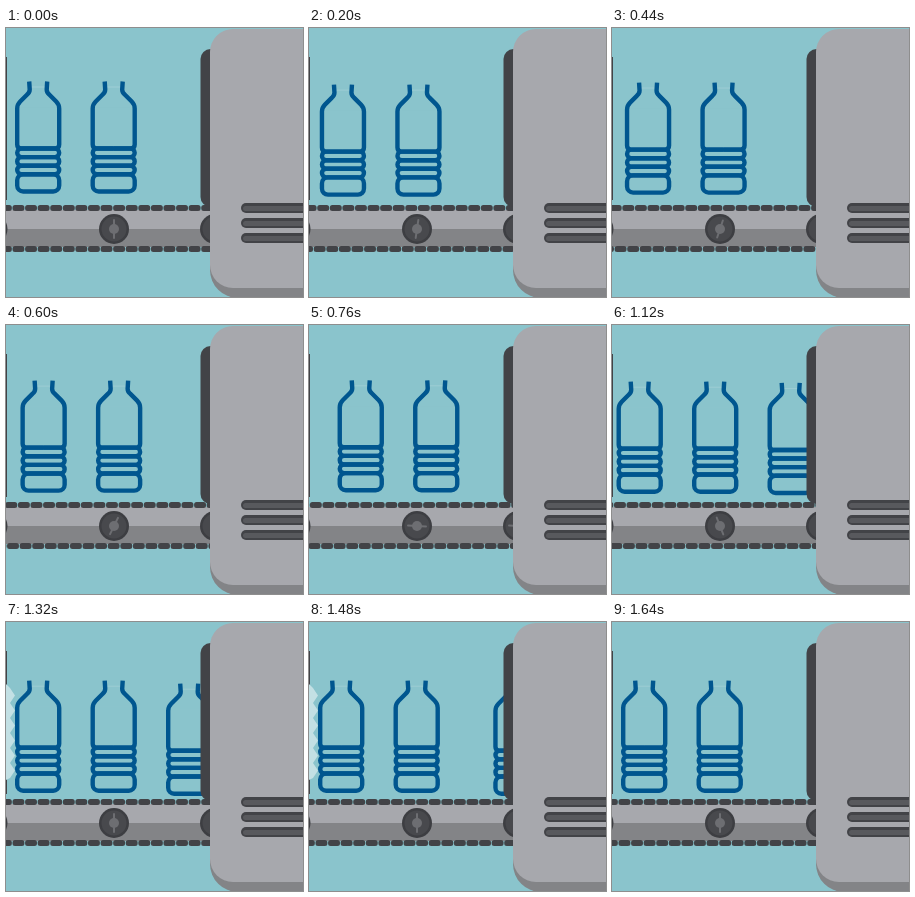
An HTML page with a canvas that plays this animation: 297 by 269 pixels, repeating every 1680 ms.

```html
<!DOCTYPE html>
<html lang="en">
<head>
<meta charset="utf-8">
<title>Bottle conveyor</title>
<style>
html, body { margin: 0; width: 100%; height: 100%; overflow: hidden; background: #8ac4cc; }
canvas { display: block; }
</style>
</head>
<body>
<canvas id="stage" width="297" height="269"></canvas>
<script>
const ctx = document.getElementById('stage').getContext('2d');
const LOOP = 1680, STEP = 40, PITCH = 75.5;
const SKY = '#8ac4cc', DARK = '#424347', LIGHT = '#a7a8ad', SHADE = '#838487', BLUE = '#00568f';

const clamp = v => Math.min(1, Math.max(0, v));

function ease(t, start, duration) {
  const u = clamp((t - start) / duration);
  return u * u * (3 - 2 * u);
}

// A slow creep, then one quick eased push to the next place
const travel = t => 5 * clamp(t / 570) + (PITCH - 5) * ease(t, 570, 650);

// A small bob that settles, then a slight sink
const baseline = t =>
  167.3 - 1.8 * Math.cos(t / 420 * Math.PI * 2) * clamp(1 - t / 760) + 3.4 * ease(t, 960, 360);

function box(x, y, w, h, r, color) {
  ctx.beginPath();
  ctx.roundRect(x, y, w, h, r);
  ctx.fillStyle = color;
  ctx.fill();
}

function disc(x, y, r, color) {
  ctx.beginPath();
  ctx.arc(x, y, r, 0, Math.PI * 2);
  ctx.fillStyle = color;
  ctx.fill();
}

// Half of the upper outline; side is -1 or 1
function shoulder(side) {
  ctx.beginPath();
  ctx.moveTo(9 * side, -112);
  ctx.lineTo(8.5 * side, -104);
  ctx.quadraticCurveTo(8.5 * side, -101, 11 * side, -99);
  ctx.lineTo(18 * side, -92);
  ctx.quadraticCurveTo(21 * side, -89, 21 * side, -85);
  ctx.lineTo(21 * side, -49);
  ctx.quadraticCurveTo(21 * side, -45, 17 * side, -45);
  ctx.lineTo(0, -45);
  ctx.stroke();
}

function bottle(x, bottom) {
  ctx.save();
  ctx.translate(x, bottom);
  box(-8, -107, 16, 1, 0, '#9ccdd4');
  box(-21, -86, 42, 84, 4, SKY);
  ctx.strokeStyle = BLUE;
  ctx.lineWidth = 4.4;
  ctx.lineJoin = 'round';
  shoulder(-1);
  shoulder(1);
  const rib = 8.6;
  for (let i = 0; i < 4; i++) {
    const last = i === 3;
    ctx.beginPath();
    ctx.roundRect(-21, -45 + i * rib, 42, last ? 17.2 : rib, last ? 6 : rib / 2);
    ctx.stroke();
  }
  ctx.restore();
}

function treads(y, shift) {
  const pitch = PITCH / 6;
  const start = (6.5 + shift + PITCH) % pitch - pitch;
  for (let x = start; x < 206; x += pitch) box(x, y, pitch - .7, 6, 2.5, DARK);
}

function pulley(x, angle) {
  disc(x, 201, 15, '#3d3e42');
  disc(x, 201, 12.5, '#48494d');
  ctx.save();
  ctx.translate(x, 201);
  ctx.rotate(angle);
  box(-1, -10, 2, 20, 1, '#6d6e72');
  ctx.restore();
  disc(x, 201, 5, '#6d6e72');
}

function belt(shift) {
  box(0, 182, 206, 19, 0, LIGHT);
  box(0, 201, 206, 18, 0, SHADE);
  treads(177, shift);
  treads(218, -shift);
  const angle = shift / PITCH * Math.PI * 2;
  [-13.5, 108, 209].forEach(x => pulley(x, angle));
}

function machine() {
  box(194.5, 21, 30, 158, 10, DARK);
  box(204, 20, 130, 250, 28, SHADE);
  box(204, 1, 130, 259, 23, LIGHT);
  for (let y = 175; y <= 205; y += 15) {
    box(235, y, 80, 10, 5, DARK);
    box(237, y + 3, 80, 5, 2.5, '#58595d');
  }
}

function burst() {
  ctx.fillStyle = '#c3e0e4';
  ctx.beginPath();
  ctx.moveTo(0, 62);
  for (let i = 0; i <= 12; i++) ctx.lineTo(i % 2 ? 9 : 4, 66 + i * 7.5);
  ctx.lineTo(0, 158);
  ctx.fill();
}

function draw(t) {
  const shift = travel(t), bottom = baseline(t);
  box(0, 0, 297, 269, 0, SKY);
  box(0, 29, 1, 143, 0, DARK);
  if (t >= 1200 && t < 1500) burst();
  belt(shift);
  bottle(32.2 - PITCH + shift, bottom);
  bottle(32.2 + shift, bottom);
  // The leading bottle carries on into the machine
  bottle(32.2 + PITCH + shift + 40 * ease(t, 1320, 280), bottom + 3 * ease(t, 960, 360));
  machine();
}

const origin = performance.now();
function tick() {
  const t = (performance.now() - origin) % LOOP;
  draw(Math.floor(t / STEP) * STEP);
  requestAnimationFrame(tick);
}
tick();
</script>
</body>
</html>
```
